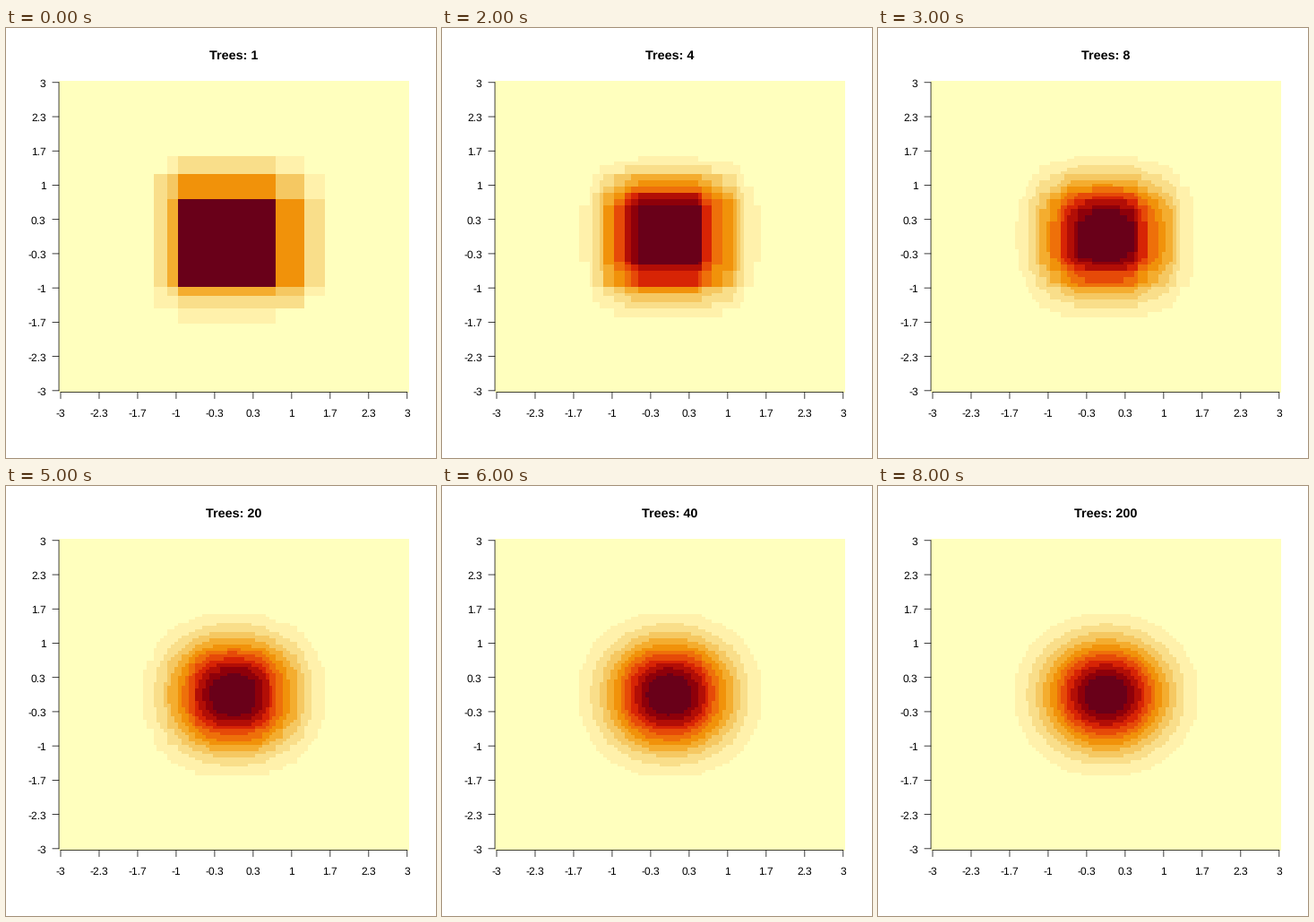
A matplotlib script for the animation above (9000 ms loop, 480 by 480 pixels).

```python
import numpy as np
import matplotlib.pyplot as plt
from matplotlib.animation import FuncAnimation
from matplotlib.colors import ListedColormap

W = H = 480
DPI = 96
PT = 72 / DPI
N = 100
LEFT, RIGHT, TOP, BOTTOM = 59.04, 449.76, 59.04, 406.56
CW, CH = (RIGHT - LEFT) / N, (BOTTOM - TOP) / N

HEAT = ListedColormap([
    "#ffffbe", "#fff1ab", "#f9de8a", "#f5c862", "#f4ad2f", "#f1920a",
    "#ee700a", "#e64a08", "#d72405", "#b20e06", "#8e000a", "#690019"])

TREES = [1, 2, 4, 8, 12, 20, 40, 100, 200]
AXIS = np.linspace(-3, 3, N)

# Split points of the coarse first trees; later trees are random and finer.
X_SPLITS = [
    [-1.39, -1.15, -0.97, 0.73, 1.21, 1.58],
    [-1.33, -0.79, 0.55, 1.09, 1.45],
    [-1.58, -1.15, -0.55, 0.48, 0.91, 1.27],
    [-1.58, -1.21, -0.67, 0.55, 1.15, 1.58],
]
Y_SPLITS = [
    [-1.70, -1.39, -1.15, -0.97, 0.73, 1.21, 1.58],
    [-1.58, -1.27, -0.67, 0.97, 1.09, 1.45],
    [-1.39, -1.09, -0.55, 0.85, 1.39],
    [-1.58, -0.97, -0.48, 0.61, 1.21, 1.58],
]


def stair(splits):
    """One tree's step approximation of exp(-x^2) along an axis."""
    leaf = np.searchsorted(splits, AXIS)
    size = np.maximum(np.bincount(leaf), 1)
    mean = np.bincount(leaf, np.abs(AXIS)) / size
    return np.exp(-mean[leaf] ** 2)


def grow(first, seed):
    rng = np.random.default_rng(seed)
    splits = list(first)
    while len(splits) < max(TREES):
        splits.append(np.arange(-3, 3, 0.25) + rng.uniform(0, 0.25))
    return np.array([stair(s) for s in splits])


def radius(trees):
    """Distance from the centre implied by the averaged trees."""
    g = trees.mean(axis=0)
    g = (g - g.min()) / (g.max() - g.min())
    return np.sqrt(-np.log(np.maximum(g, 1e-9)))


def levels(n):
    q = 2 + 1.1 / n**0.6  # boxy with few trees, round with many
    rx, ry = radius(X_TREES[:n])[None, :], radius(Y_TREES[:n])[::-1, None]
    r = (rx**q + ry**q) ** (1 / q)
    peak = 1 - 0.05 * (1 - 1 / n) ** 2
    return np.clip(12 * np.exp(-r**2) / peak, 0, 11).astype(int)


X_TREES, Y_TREES = grow(X_SPLITS, 1), grow(Y_SPLITS, 2)
GRIDS = [levels(n) for n in TREES]

plt.rcParams["font.family"] = "Liberation Sans"
plt.rcParams["text.hinting"] = "none"
fig = plt.figure(figsize=(W / DPI, H / DPI), dpi=DPI, facecolor="white")
ax = fig.add_axes([0, 0, 1, 1])
image = ax.imshow(GRIDS[0], cmap=HEAT, vmin=-0.5, vmax=11.5, aspect="auto",
                  extent=(LEFT, RIGHT, BOTTOM, TOP), interpolation="nearest")
ax.set_xlim(0, W)
ax.set_ylim(H, 0)
ax.axis("off")


def line(xs, ys):
    ax.plot(xs, ys, color="black", lw=0.75 * PT, snap=False,
            solid_capstyle="round")


def label(x, y, text, **kw):
    return ax.text(x, y, text, va="baseline", **kw)


X0, X1 = LEFT + CW / 2, RIGHT - CW / 2
Y0, Y1 = BOTTOM - CH / 2, TOP + CH / 2
line([X0, X1], [BOTTOM, BOTTOM])
line([LEFT, LEFT], [Y0, Y1])
for i, value in enumerate(np.linspace(-3, 3, 10)):
    x = X0 + (X1 - X0) * i / 9
    y = Y0 + (Y1 - Y0) * i / 9
    text = f"{round(value, 1):g}"
    line([x, x], [BOTTOM, BOTTOM + 7.2])
    line([LEFT, LEFT - 7.2], [y, y])
    label(x, 433.6, text, ha="center", size=12 * PT)
    label(44.7, y + 4.9, text, ha="right", size=12 * PT)

title = label((LEFT + RIGHT) / 2, 35, "", ha="center", size=14.4 * PT,
              weight="bold")


def update(i):
    image.set_data(GRIDS[i])
    title.set_text(f"Trees: {TREES[i]}")
    return image, title


anim = FuncAnimation(fig, update, frames=len(TREES), interval=1000,
                     repeat=True, repeat_delay=0)
plt.show()
```
